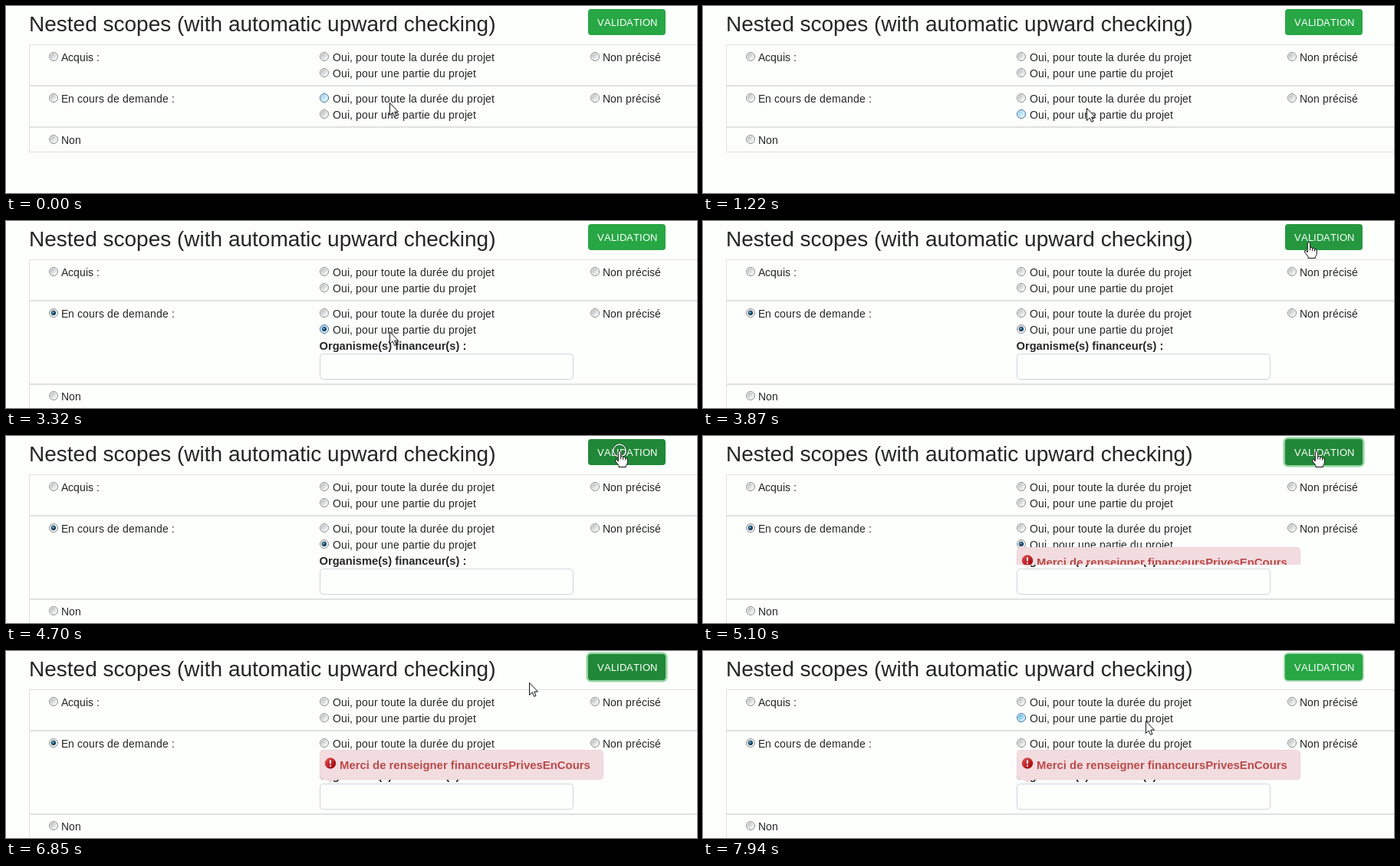
Write an HTML page with a canvas that moves like this. It is 901 by 244 pixels and loops after 8 s.

```html
<!DOCTYPE html>
<html lang="fr">
<head>
<meta charset="utf-8">
<title>Nested scopes</title>
<style>
  html, body { margin: 0; width: 100%; height: 100%; overflow: hidden; background: #fdfffd; }
  canvas { display: block; }
</style>
</head>
<body>
<canvas id="stage" width="901" height="244"></canvas>
<script>
const ctx = document.getElementById('stage').getContext('2d', { alpha: false });
const PAGE = '#fdfffd', INK = '#252525', LINE = '#dee2e0', PINK = '#f2dce0', RING = '#93d3a1';
const FONT = '"Liberation Sans", Arial, sans-serif';

const LOOP = 8000, TICK = 136.6, LEAD = 10;
const PICK = 12, SUBMIT = 34, PICK_AGAIN = 58;
const ENTER_BUTTON = 27, LEAVE_BUTTON = 50;

// Mouse path as [tick, x, y], straight in between.
const path = [
  [0, 500, 126], [1, 500, 120], [7, 500, 120], [10, 500, 140], [11, 498, 143], [24, 500, 144],
  [25, 596, 115], [27, 779, 34], [29, 800, 20], [31, 800, 19], [49, 800, 19],
  [50, 682, 41], [52, 593, 87], [54, 573, 94], [58, 577, 91]
];

const ramp = (n, from, to) => Math.min(1, Math.max(0, (n - from) / (to - from)));
const swing = p => .5 - .5 * Math.cos(Math.PI * p);

function mouseAt(n) {
  const i = Math.max(1, path.findIndex(([tick]) => tick >= n));
  const [from, x0, y0] = path[i - 1], [to, x1, y1] = path[i];
  const p = ramp(n, from, to);
  return [Math.round(x0 + (x1 - x0) * p), Math.round(y0 + (y1 - y0) * p)];
}

const arrow = new Path2D('M.5.5V16.5L4.2 13L6.6 18.4L9 17.4L6.7 12.1H11.5Z');
const hand = new Path2D('M-1.7 2Q0-1 1.7 2V8Q3.5 6.5 4.6 8.6Q6.6 7.4 7.6 9.6Q10.4 9 10.4 12V15.5' +
  'Q10.2 18 8.4 19.5V21.5H-1V19.5L-5.2 14Q-6.4 10.8-3.6 11.6L-1.7 14ZM1.7 8V11.5M4.6 8.6V12M7.6 9.6V12.5');

function setType(size, color, weight = 'normal') {
  ctx.font = `${weight} ${size}px ${FONT}`;
  ctx.fillStyle = color;
}

function text(string, x, y, size, color, weight) {
  setType(size, color, weight);
  ctx.fillText(string, x, y);
}

// Small type is set on whole pixels, as hinted screen fonts are.
function hintedText(string, x, y, size = 14, color = INK) {
  setType(size, color);
  for (const char of string) {
    ctx.fillText(char, x, y);
    x += Math.round(ctx.measureText(char).width);
  }
  return x;
}

function box(x, y, w, h, r, fill, stroke) {
  ctx.beginPath();
  ctx.roundRect(x, y, w, h, r);
  ctx.fillStyle = fill;
  ctx.fill();
  if (stroke) { ctx.strokeStyle = stroke; ctx.lineWidth = 1; ctx.stroke(); }
}

function disc(x, y, r, fill, stroke, width = 1) {
  ctx.beginPath();
  ctx.arc(x, y, r, 0, 7);
  if (fill) { ctx.fillStyle = fill; ctx.fill(); }
  if (stroke) { ctx.strokeStyle = stroke; ctx.lineWidth = width; ctx.stroke(); }
}

function gradient(x, y, r, from, to) {
  const g = ctx.createLinearGradient(x - r, y - r, x + r, y + r);
  g.addColorStop(.15, from);
  g.addColorStop(.85, to);
  return g;
}

function radio(x, y, label, { gap = 10, checked, mouse, pressing } = {}) {
  const end = hintedText(label, x + gap, y + 6);
  const hover = mouse && mouse[0] >= x - 6 && mouse[0] < end && Math.abs(mouse[1] - y) < 11;
  const [from, to] = hover && pressing ? ['#6cbde8', '#caebfb']
    : hover ? ['#9fd5f2', '#e6f7fe'] : ['#bfc3c6', '#f6f7f7'];
  disc(x, y, 5.5, '#f4f4f4', hover ? '#33709a' : '#8b8e8e');
  disc(x, y, 4.2, gradient(x, y, 4, from, to));
  if (checked) {
    disc(x, y, 3, '#143a59');
    disc(x - .6, y - .6, 1.3, '#58b4dc');
  }
}

function button(shade, ring) {
  const glow = (spread, color) =>
    box(759 - spread, 4 - spread, 101 + 2 * spread, 34 + 2 * spread, 4 + spread, color);
  if (ring) {
    glow(ring, '#c9e8d0');
    glow(ring * .7, RING);
  }
  const mix = (a, b) => a + (b - a) * shade;
  glow(0, `rgb(${mix(40, 33)},${mix(167, 136)},${mix(69, 56)})`);
  hintedText('VALIDATION', 771, 26, 13, '#fff');
}

function popup(height) {
  if (!height) return;
  const top = 168 - height, iconY = top + 17.5;
  ctx.fillStyle = PINK;
  ctx.fill(new Path2D('M418 168H428L423 172.5Z'));
  ctx.save();
  ctx.beginPath();
  ctx.rect(409, top, 370, height);
  ctx.clip();
  box(409.5, top + .5, 369, 38, 4, PINK, '#eed3d7');
  disc(423, iconY, 7.2, gradient(423, iconY, 7, '#dc4648', '#a3090f'));
  box(422, iconY - 4.5, 2, 5.5, 1, '#fff');
  disc(423, iconY + 3.3, 1.1, '#fff');
  text('Merci de renseigner financeursPrivesEnCours', 435, top + 25, 14.9, '#b94a48', 'bold');
  ctx.restore();
}

function pointer([x, y], shape, clicking) {
  if (clicking) {
    disc(x, y, 8, null, 'rgba(0,0,0,.35)', 3);
    disc(x, y, 8, null, '#fff', 1.3);
  }
  ctx.save();
  ctx.translate(x, y);
  ctx.fillStyle = '#fff';
  ctx.strokeStyle = '#111';
  ctx.lineWidth = 1;
  ctx.fill(shape);
  ctx.stroke(shape);
  ctx.restore();
}

function draw(n) {
  const open = n > PICK;
  const pressing = n === PICK || n === PICK_AGAIN;
  const onButton = n >= ENTER_BUTTON && n < LEAVE_BUTTON;
  const mouse = mouseAt(n);

  ctx.fillStyle = PAGE;
  ctx.fillRect(0, 0, 901, 244);
  text('Nested scopes (with automatic upward checking)', 30, 33, 28, INK);

  const shade = ramp(n, ENTER_BUTTON, ENTER_BUTTON + 2) - ramp(n, LEAVE_BUTTON, LEAVE_BUTTON + 2);
  const ring = 3 * ramp(n, SUBMIT, SUBMIT + 2) - ramp(n, PICK_AGAIN - 1, PICK_AGAIN);
  button(shade, ring);

  const split = open ? 212 : 157, end = open ? 245 : 190;
  ctx.fillStyle = LINE;
  ctx.fillRect(30, 50, 1, end - 49);
  for (const [top, h] of [[50, 1], [103, 2], [split, 2], [end, 1]]) ctx.fillRect(30, top, 871, h);

  ['Acquis :', 'En cours de demande :'].forEach((label, row) => {
    const y = 66 + 54 * row, chosen = open && row === 1;
    radio(62, y, label, { checked: chosen });
    ['toute la durée', 'une partie'].forEach((part, i) =>
      radio(415, y + 21 * i, `Oui, pour ${part} du projet`,
        { gap: 11, checked: chosen && i === 1, mouse, pressing }));
    radio(768, y, 'Non précisé');
  });
  radio(62, open ? 228 : 174, 'Non');

  if (open) {
    text('Organisme(s) financeur(s) :', 408.5, 168, 14.7, INK, 'bold');
    box(409.5, 173.5, 330, 33, 4, PAGE, '#ced4da');
  }
  popup(Math.round(39 * swing(ramp(n, SUBMIT + 1, SUBMIT + 4.6))));
  pointer(mouse, onButton ? hand : arrow, n === PICK || n === SUBMIT);
}

const start = performance.now();
function play() {
  const t = (performance.now() - start) % LOOP;
  draw(Math.floor((t + LEAD) / TICK));
  requestAnimationFrame(play);
}
play();
</script>
</body>
</html>
```
